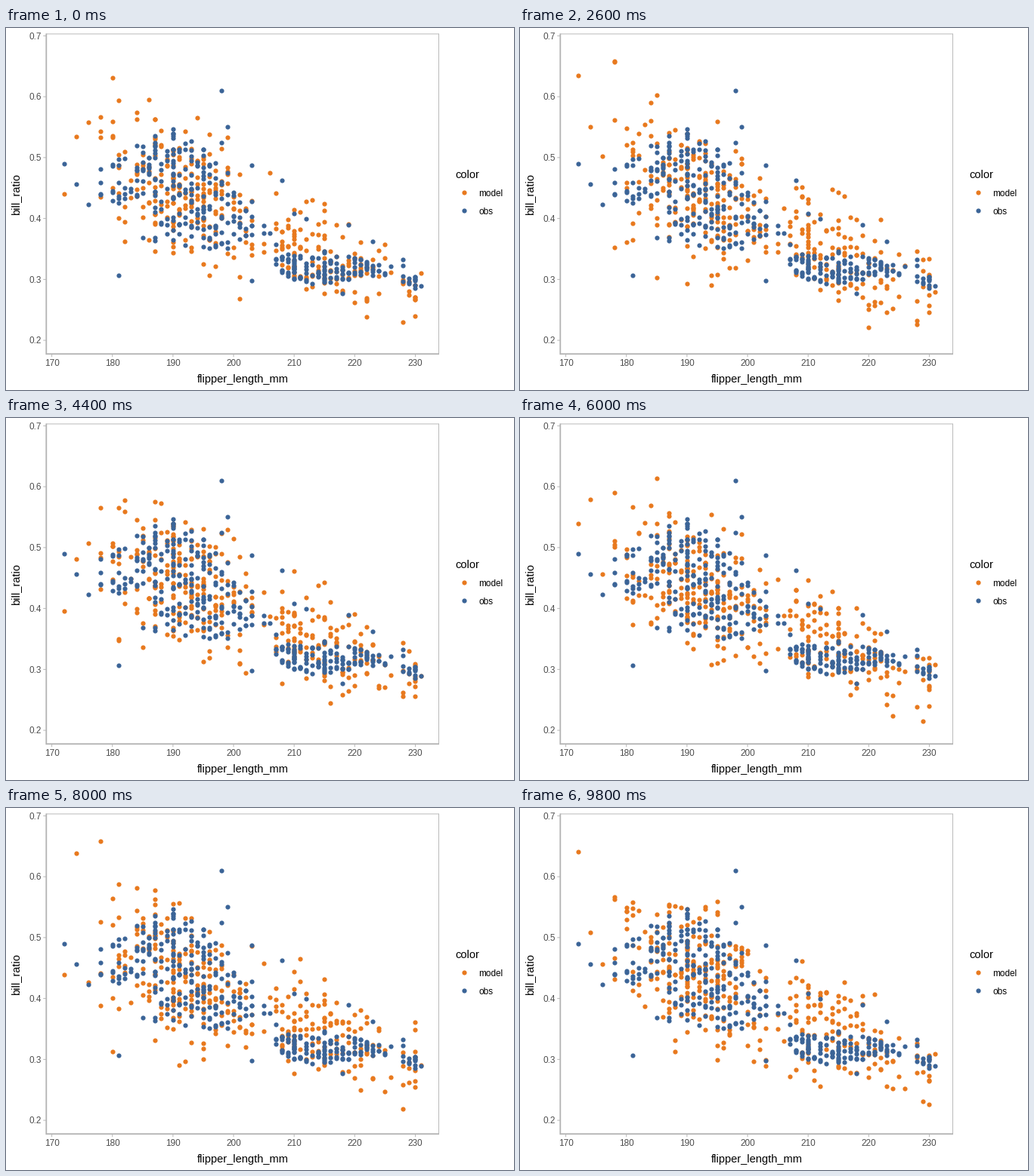
A matplotlib script that plays this animation: 672x480 px, repeating every 10 s.

```python
import numpy as np
import matplotlib.pyplot as plt
from matplotlib.animation import FuncAnimation

W, H, DPI = 672, 480, 96
FRAMES, INTERVAL = 50, 200
ORANGE, BLUE = "#E8791E", "#3B6497"
GREY, TICK_TEXT = "#b3b3b3", "#4d4d4d"
PX = 72 / DPI                      # points per pixel
L, R, T, B = 53.3, 572.5, 7.9, 432.2

plt.rcParams["font.family"] = "Liberation Sans"

# Key points of piecewise-linear curves over flipper length.
COUNT = [(172, 1), (176, 1), (178, 4), (181, 6), (183, 2), (184, 7), (189, 7),
         (197, 10), (199, 6), (203, 5), (206, 1), (208, 7), (214, 6),
         (222, 6), (224, 3), (226, 1), (228, 4), (231, 1)]
LOW = [(172, .49), (176, .423), (181, .42), (186, .44), (187, .363),
       (199, .345), (206, .376), (207, .32), (211, .287), (222, .305),
       (230, .285), (231, .289)]
HIGH = [(172, .491), (176, .423), (178, .486), (184, .53), (191, .56),
        (196, .51), (202, .45), (206, .376), (208, .34), (215, .347),
        (226, .325), (228, .341), (231, .289)]
CROWDED = {187: 16, 190: 22, 191: 13, 193: 15, 195: 17, 210: 14, 215: 12, 230: 7}
LONE = [(181, .307), (185, .368), (198, .61), (198, .525), (199, .55),
        (203, .488), (203, .298), (208, .463), (210, .408), (212, .4),
        (218, .277), (219, .39), (223, .362)]


def curve(knots, x):
    return np.interp(x, *zip(*knots))


def px(x):
    return 60.6 + (np.asarray(x) - 170) * 8.014


def py(v):
    return 414.1 - (np.asarray(v) - 0.2) * 807.5


XS = [x for x in range(172, 232) if x not in (173, 175, 177, 179, 204, 227)]
FLIPPER = np.repeat(XS, [CROWDED.get(x, round(curve(COUNT, x))) for x in XS])
MEAN = 0.447 - 0.0042 * (FLIPPER - 190)
SIGMA = 0.055 * np.exp(-0.014 * (FLIPPER - 190))


def observed():
    """Scatter each column between its bounds, then add the lone points."""
    rng = np.random.default_rng(4)
    t = rng.beta(1.1, 1.2, FLIPPER.size)
    low, high = curve(LOW, FLIPPER), curve(HIGH, FLIPPER)
    lone_x, lone_y = zip(*LONE)
    return np.append(FLIPPER, lone_x), np.append(low + (high - low) * t, lone_y)


def predicted(i):
    """One draw from the model: linear mean, log-linear spread."""
    z = np.random.default_rng(100 + i).standard_normal(FLIPPER.size)
    return MEAN + SIGMA * np.clip(z, -2.8, 2.6)


fig = plt.figure(figsize=(W / DPI, H / DPI), dpi=DPI, facecolor="white")
ax = fig.add_axes([0, 0, 1, 1])
ax.set(xlim=(0, W), ylim=(H, 0))
ax.axis("off")


def line(x, y, width):
    ax.plot(x, y, color=GREY, lw=width * PX, solid_capstyle="butt",
            snap=False, zorder=4)


def label(x, y, text, size=8.8, **kw):
    ax.text(x, y, text, fontsize=size, va="baseline", **kw)


def dots(x, y, color, zorder=2):
    return ax.plot(x, y, "o", ms=6.2 * PX, mew=0, color=color,
                   snap=False, zorder=zorder)[0]


line((L, R + 0.5), (T, T), 0.9)
line((R, R), (T, B), 0.9)
line((L, L), (T - 0.5, B + 0.9), 1.8)
line((L, R + 0.5), (B, B), 1.8)

for x in range(170, 231, 10):
    line((px(x), px(x)), (B, B + 4), 0.95)
    label(px(x), 447.8, str(x), color=TICK_TEXT, ha="center")
for k in range(2, 8):
    y = py(k / 10)
    line((L - 4, L), (y, y), 0.95)
    label(46.6, y + 4.3, f"0.{k}", color=TICK_TEXT, ha="right")

label((L + R) / 2, 469.6, "flipper_length_mm", 11, ha="center")
label(16.8, (T + B) / 2, "bill_ratio", 11, ha="center",
      rotation=90, rotation_mode="anchor")

label(594.8, 199, "color", 11)
for y, name, color in ((218.4, "model", ORANGE), (242.4, "obs", BLUE)):
    dots([606.4], [y], color)
    label(625, y + 4.4, name)

model = dots([], [], ORANGE)
obs_x, obs_y = observed()
dots(px(obs_x), py(obs_y), BLUE, zorder=3)


def update(i):
    model.set_data(px(FLIPPER), py(predicted(i)))
    return model,


anim = FuncAnimation(fig, update, frames=FRAMES, interval=INTERVAL,
                     repeat=True, repeat_delay=0, blit=False)
plt.show()
```
